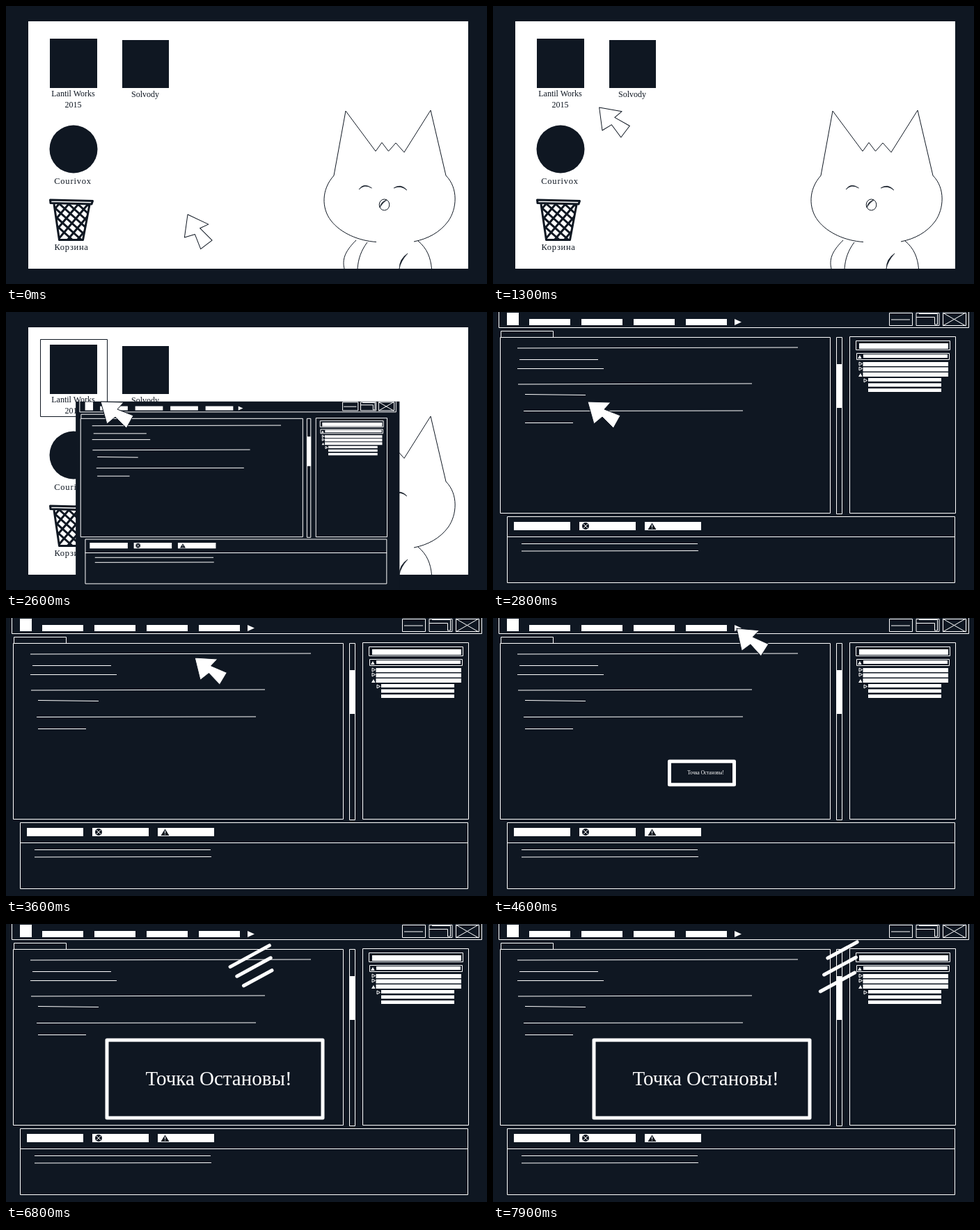
Animation, 691 px wide and 400 px high, one loop 8 s. Source, as an HTML page:

```html
<!DOCTYPE html>
<html lang="ru">
<head>
<meta charset="utf-8">
<title>Desktop</title>
<style>
  html, body { margin: 0; width: 100%; height: 100%; overflow: hidden; background: #0f1722; }
  svg { display: block; width: 100vw; height: 100vh; }
  text { font-family: "Liberation Serif", "Times New Roman", serif; text-anchor: middle; }
  .ink { fill: none; stroke: #0f1722; stroke-linejoin: round; }
  .dark { fill: #0f1722; }
  .line { fill: none; stroke: #fff; }
  .line * { vector-effect: non-scaling-stroke; }
  .fat { stroke: #fff; stroke-width: 5; stroke-linecap: round; stroke-linejoin: round; }
</style>
</head>
<body>
<svg viewBox="0 0 691 400">
  <clipPath id="basket"><path d="M69 284L76 337H111L120 284Z"/></clipPath>
  <rect class="dark" width="691" height="400"/>

  <g id="desk">
    <rect x="32" y="22" width="632" height="356" fill="#fff"/>
    <g class="dark" font-size="12">
      <rect x="63" y="47" width="68" height="71"/>
      <text x="96.500" y="130">Lantil Works</text>
      <text x="96.500" y="146">2015</text>
      <rect x="167" y="49" width="67" height="69"/>
      <text x="200" y="131">Solvody</text>
      <circle cx="97" cy="206" r="34.500"/>
      <text x="96" y="256" font-size="12.500" letter-spacing=".8">Courivox</text>
      <text x="94" y="351" font-size="12.500" letter-spacing=".7">Корзина</text>
    </g>
    <g class="ink" stroke-width="3">
      <path d="M63.500 279L124.500 280.500L123 285L64 283.500Z"/>
      <path d="M69 285L76.500 336.500H110.500L120 286"/>
      <path id="mesh" clip-path="url(#basket)"/>
    </g>
    <g class="ink">
      <path d="M471 244L488 151L531 209L540 196.500L549.500 209L560 197L572 210.500L610 150L632 244"/>
      <path d="M471 244C453 264 453 291 467 309C481 327 507 338 532 339.500"/>
      <path d="M632 244C650 262 648 292 635 310C623 326 606 335 586 339"/>
      <path d="M503 337C490 350 482 362 486 378M519 340C510 352 506 364 505 378M592 338C605 349 610 362 611.500 378"/>
      <ellipse cx="543.500" cy="286" rx="7.300" ry="8"/>
      <g class="dark" stroke-width=".6">
        <path d="M507 264Q514 253.500 525.500 262Q515 255.500 507 264Z"/>
        <path d="M557 262Q567 255 576 265Q567 257.500 557 262Z"/>
        <path d="M537 290Q539 281 547 279Q540 284 537 290Z"/>
        <path d="M577 356Q565 364 565 378Q567 367 577 356Z"/>
      </g>
    </g>
    <rect id="pick" class="ink" x="49.500" y="39.500" width="96" height="111"/>
  </g>

  <g id="win">
    <rect class="dark" width="691" height="400"/>
    <g fill="#fff">
      <path id="bars"/>
      <rect x="20" y="1" width="17" height="18"/>
      <path d="M347 10L357 14.500L347 19ZM524 67H529.500L527 62ZM525 93H530.500L528 88Z"/>
    </g>
    <g class="line">
      <path d="M8.500 -.5V22.500H683.500V-.5M11.500 36V27.500H86.500V36M10.500 36.500H484.500V289.500H10.500ZM493.500 36.500H501.500V290.500H493.500Z"/>
      <path d="M512.500 35.500H664.500V289.500H512.500ZM521.500 41.500H656.500V54.500H521.500ZM522.500 59.500H655.500V68.500H522.500ZM20.500 294.500H663.500V389.500H20.500ZM20 323.500H664"/>
      <path id="buttons"/>
      <path d="M572 11H599M608 7.500H634.500V18H638.500V2.500H612M646 1L679 20M679 1L646 20"/>
      <path d="M526 72L530.500 74.500L526 77ZM526 79L530.500 81.500L526 84ZM533 96L537.500 98.500L533 101Z"/>
      <path d="M35 52L438 51M38 68.500H151M35 81.500H159M36 104L372 103M46 118.500L133 119.500M44 142.500L359 142M46 159.500H115M41 333.500H294M41 344L295 343.500"/>
    </g>
    <circle class="dark" cx="133" cy="308" r="5"/>
    <path class="dark" d="M228.500 303.500L222.500 313H234.500Z"/>
    <path d="M130 305L136 311M136 305L130 311M228.500 306V310M228.500 311V312" stroke="#fff"/>
  </g>

  <g id="dialog">
    <rect id="box" class="dark fat"/>
    <text id="msg" y="9" font-size="29" fill="#fff">Точка Остановы!</text>
  </g>
  <path id="swipe" class="fat" fill="none"/>
  <path id="arrow" d="M0 0L33 1L24 11L47 20L37 38L21 22L9 32Z" stroke-linejoin="round"/>
</svg>
<script>
const $ = id => document.getElementById(id);
const LOOP = 8000, STEP = 100;
const INK = '#0f1722';

const set = (el, attrs) => {
  for (const k in attrs) el.setAttribute(k, attrs[k]);
};
const show = (el, on) => set(el, { visibility: on ? 'visible' : 'hidden' });
const ramp = (t, from, to) => Math.max(0, Math.min(1, (t - from) / (to - from)));
const mix = (a, b, p) => a + (b - a) * p;
const repeat = (n, part) => Array.from({ length: n }, (_, i) => part(i)).join('');
const rect = (x, y, w, h) => `M${x} ${y}h${w}v${h}h${-w}z`;

// Repeated pieces of the still picture
set($('mesh'), {
  d: repeat(7, i => `M${38 + 13 * i} 285l58 52M${62 + 14 * i} 285l-44 52`)
});
set($('bars'), {
  d: repeat(4, i => rect(52 + 75 * i, 10, 59, 9)) +
    repeat(3, i => rect(531.5, 72 + 7.5 * i, 122.5, 6)) +
    repeat(3, i => rect(539, 95 + 7.5 * i, 105, 5)) +
    repeat(3, i => rect(30 + 94 * i, 302, 81, 12)) +
    rect(526, 45, 128, 8) + rect(532, 61, 121, 5) + rect(493, 75, 9, 63)
});
set($('buttons'), { d: repeat(3, i => rect(569.5 + 38.5 * i, 1.5, 33, 18)) });

// Where the pointer is: an arc to the icon, then a straight run to the play button
function pointer(t) {
  const a = ramp(t, 0, 1500), b = ramp(t, 3000, 3950);
  const lift = 50 * a * (1 - a);
  return {
    x: mix(261, 136, a) + 214 * b,
    y: mix(300, 129, a) - lift - 114 * b,
    turn: 23.6 * (1 - a ** 3) + 3 * b
  };
}

// Three slanted strokes that fly along an arc and change their spacing on the way
function swipe(ms) {
  const v = (ms - 300) / 500;
  const x = 208 + 275 * v + 19 * v * v;
  const y = 89 - 119.5 * v + 68 * v * v;
  return repeat(3, i => {
    const half = mix(40 - 11 * i, 24 + 2 * i, Math.max(0, v));
    const cx = x + i * mix(15, -3.5, v), cy = y + i * mix(8.5, 23, v);
    const dx = half * 0.88, dy = half * -0.48;
    return `M${cx - dx} ${cy - dy}L${cx + dx} ${cy + dy}`;
  });
}

function draw(t) {
  const { x, y, turn } = pointer(t);
  const pressed = t >= 4200 && t < 4400;
  set($('arrow'), {
    transform: `translate(${x} ${y}) rotate(${turn})`,
    fill: pressed ? INK : '#fff',
    stroke: pressed ? '#fff' : INK
  });
  show($('arrow'), t < 5400);

  // The window zooms out of a point on the lower edge
  const zoom = ramp(t, 1600, 2800) ** 2.17;
  const clicked = t >= 1700 && t < 1800;
  show($('desk'), zoom < 1);
  show($('pick'), t >= 1500 && zoom < 1 && !clicked);
  show($('win'), zoom > 0);
  set($('win'), { transform: `translate(306.5 394) scale(${zoom}) translate(-306.5 -394)` });

  const grow = ramp(t, 4600, 5100);
  const size = mix(0.3, 1, grow), w = 310 * size, h = 112 * size;
  show($('dialog'), t >= 4600);
  set($('box'), { x: 300 - w / 2, y: 223 - h / 2, width: w, height: h });
  set($('msg'), { transform: `translate(305.5 222.5) scale(${mix(0.25, 1, grow)})` });

  show($('swipe'), t >= 5400);
  set($('swipe'), { d: swipe(Math.max(0, t - 5400) % 850) });
}

const start = performance.now();
function tick() {
  const t = (performance.now() - start) % LOOP;
  draw(Math.floor(t / STEP) * STEP);
  requestAnimationFrame(tick);
}
tick();
</script>
</body>
</html>
```
